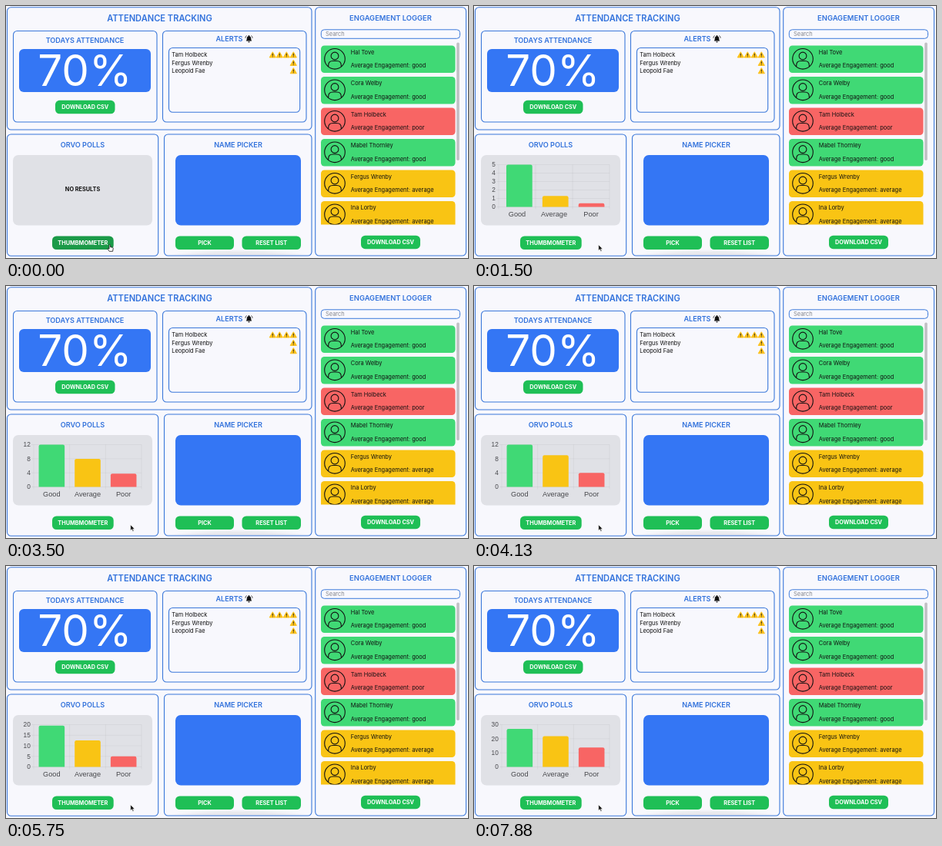
Recreate the animation shown at these times as an HTML page. Size 600 px wide and 328 px high, loop 8 s.

```html
<!DOCTYPE html>
<html lang="en">
<head>
<meta charset="utf-8">
<title>Attendance tracking</title>
<style>
  html, body { margin: 0; width: 100%; height: 100%; overflow: hidden; background: #f8f8fd; }
  svg { display: block; width: 100vw; height: 100vh; }
  text { font-family: Inter, "Open Sans", sans-serif; font-size: 7.45px; fill: #111; }
  .mid { text-anchor: middle; }
  .head { font-size: 9.1px; font-weight: 600; fill: #3272dc; text-anchor: middle; }
  .panel { fill: none; stroke: #3b78da; stroke-width: 1.1; }
  .blue { fill: #3476f4; }
  .btn rect { fill: #1fbf56; }
  .btn text { fill: #fff; font-size: 7.3px; font-weight: 700; text-anchor: middle; }
  .axis, .cats text { font-family: "Liberation Sans", Arial, sans-serif; fill: #48494d; }
  .axis { font-size: 8.3px; text-anchor: end; }
  .cats text { font-size: 9.2px; text-anchor: middle; }
</style>
</head>
<body>
<svg viewBox="0 0 600 328" preserveAspectRatio="none">
  <defs>
    <g id="person" fill="none" stroke="#111" stroke-width="1.1">
      <circle r="13.3"/>
      <circle cy="-3.8" r="4.9"/>
      <path d="M-8.3 10.2V8.5C-8.3 4.5-5.5 2.7-2.5 2.7H2.5C5.5 2.7 8.3 4.5 8.3 8.5V10.2"/>
    </g>
    <g id="warn">
      <path d="M0-3.7L4.1 3.5H-4.1Z" fill="#fcc21b" stroke="#fcc21b" stroke-linejoin="round"/>
      <path d="M0-1.7V1.2M0 2V2.9" stroke="#222"/>
    </g>
    <clipPath id="list"><rect x="405" y="48" width="182" height="236.5"/></clipPath>
    <radialGradient id="shade">
      <stop offset="0" stop-color="#000" stop-opacity=".08"/>
      <stop offset=".6" stop-color="#000" stop-opacity=".06"/>
      <stop offset="1" stop-color="#000" stop-opacity="0"/>
    </radialGradient>
    <clipPath id="picker"><rect x="206" y="317" width="190.5" height="8"/></clipPath>
  </defs>
  <rect width="600" height="328" fill="#f8f8fd"/>
  <ellipse cx="303" cy="326" rx="96" ry="9" fill="url(#shade)" clip-path="url(#picker)"/>
  <g id="panels"></g>

  <text class="head" x="199.5" y="20" style="font-size:11.1px">ATTENDANCE TRACKING</text>
  <text class="head" x="102.5" y="47.5">TODAYS ATTENDANCE</text>
  <text class="head" x="290" y="46">ALERTS</text>
  <text class="head" x="499.5" y="18.7" style="font-size:9.4px">ENGAGEMENT LOGGER</text>
  <text class="head" x="99.5" y="184">ORVO POLLS</text>
  <text class="head" x="301.5" y="184">NAME PICKER</text>

  <g transform="translate(315.5 42.7) scale(.9)">
    <path d="M-4.2 3.2C-2.9 1.9-3.2 .4-3-1C-2.7-3-1.5-3.9 0-4.1C1.5-3.9 2.7-3 3-1C3.2 .4 2.9 1.9 4.2 3.2ZM-1.3 3.9H1.3A1.3 1.3 0 0 1-1.3 3.9ZM-.6-5.2H.6V-3.5H-.6Z" fill="#111"/>
    <path d="M-3.3-4.8Q-5-3.3-5.2-1M3.3-4.8Q5-3.3 5.2-1" fill="none" stroke="#111" stroke-width=".8"/>
  </g>

  <rect class="blue" x="17" y="56" width="171" height="56" rx="6"/>
  <text class="mid" x="102.3" y="104" style="font-size:56.5px;font-weight:400;fill:#fff">70%</text>
  <rect class="blue" x="220" y="194" width="163" height="91.5" rx="7"/>
  <rect x="9" y="194" width="181" height="91.5" rx="7" fill="#e0e1e6"/>
  <text id="empty" class="mid" x="99.5" y="240.5" style="font-size:7.3px;font-weight:700">NO RESULTS</text>

  <g id="chart">
    <path id="grid" fill="none" stroke="#000" stroke-opacity=".09" stroke-width=".5"/>
    <g id="ticks"></g>
    <g id="cats" class="cats"><text y="274.2">Good</text><text y="274.2">Average</text><text y="274.2">Poor</text></g>
    <g id="bars"><path fill="#40d975"/><path fill="#f9c414"/><path fill="#f86564"/></g>
  </g>

  <g id="alerts"></g>
  <rect x="409.3" y="30.8" width="180.2" height="11.5" rx="4" fill="#f9f9fe" stroke="#3b78da"/>
  <text x="415" y="39.3" style="fill:#85868c">Search</text>
  <g id="rows" clip-path="url(#list)"></g>
  <rect x="585.2" y="47.5" width="3.6" height="153.5" rx="1.8" fill="#c0c0c4"/>
  <g id="buttons"></g>

  <g id="cursor" stroke-linejoin="round">
    <path id="arrow" d="M0 0V7.6L1.8 6L3 8.7L4.3 8.1L3.1 5.5H5.4Z" fill="#111" stroke="#fff" stroke-width=".6"/>
    <path id="hand" d="M-.8 .6Q0-.6 .8 .6V3L3.7 3.6Q4.6 4 4.4 5L3.8 8.6H-.6L-2.8 5.6Q-2.6 4.5-1.6 5L-.8 5.6Z" fill="#fff" stroke="#111" stroke-width=".8"/>
  </g>
</svg>
<script>
const $ = id => document.getElementById(id);
const fill = (id, items, draw) => { $(id).innerHTML = items.map(draw).join(''); };

fill('panels', [
  [1.5, 1.7, 397, 161], [9.5, 32.5, 196, 151], [203.5, 32.5, 390, 151], [211.5, 54.5, 381.7, 138.3],
  [1.5, 167, 197.7, 325.3], [205.5, 167, 397, 325], [401.7, 1.7, 597.5, 325]
], ([x, y, r, b]) => `<rect class="panel" x="${x}" y="${y}" width="${r - x}" height="${b - y}" rx="5"/>`);

fill('buttons', [
  ['DOWNLOAD CSV', 64, 122.8, 77.5], ['THUMBMOMETER', 60, 299.5, 79.7], ['PICK', 220, 299.5, 76],
  ['RESET LIST', 306.5, 299.5, 76.5], ['DOWNLOAD CSV', 461, 298.7, 77]
], ([label, x, y, w]) => `<g class="btn"><rect x="${x}" y="${y}" width="${w}" height="17.5" rx="5.5"/>
  <text x="${x + w / 2}" y="${y + 11.4}">${label}</text></g>`);

fill('alerts', [['Tam Holbeck', 4], ['Fergus Wrenby', 1], ['Leopold Fae', 1]], ([name, count], i) => {
  const y = 66.3 + i * 10.4;
  let out = `<text x="215.3" y="${y}">${name}</text>`;
  for (let k = 0; k < count; k++) out += `<use href="#warn" x="${373.3 - k * 9}" y="${y - 2.8}"/>`;
  return out;
});

const levels = { good: '#40d975', average: '#f9c414', poor: '#f86564' };
fill('rows', [
  ['Hal Tove', 'good'], ['Cora Welby', 'good'], ['Tam Holbeck', 'poor'],
  ['Mabel Thornley', 'good'], ['Fergus Wrenby', 'average'], ['Ina Lorby', 'average']
], ([name, level], i) => {
  const y = 51.5 + i * 40.5;
  return `<rect x="409" y="${y}" width="174.5" height="35.5" rx="4.5" fill="${levels[level]}"/>
    <use href="#person" x="427" y="${y + 17.3}"/>
    <text x="447.8" y="${y + 11}">${name}</text>
    <text x="447.8" y="${y + 28.5}">Average Engagement: ${level}</text>`;
});

// Poll results arrive once a second; bars ease to the new layout.
const LOOP = 8000, FIRST = 370, EVERY = 1000;
const BASE = 261.5, HEIGHT = 55, RIGHT = 176;
const polls = [
  { max: 2, step: .5, votes: [2, 0, 0] },
  { max: 5, step: 1, votes: [5, 3, 1] },
  { max: 10, step: 2, votes: [10, 6, 3] },
  { max: 12, step: 4, votes: [12, 9, 4] },
  { max: 20, step: 5, votes: [17, 10, 5] },
  { max: 20, step: 5, votes: [20, 13, 5] },
  { max: 25, step: 5, votes: [23, 16, 9] },
  { max: 30, step: 10, votes: [27, 22, 14] }
];
const left = p => p.step < 1 ? 38 : p.max < 10 ? 32 : 36;
const slot = p => (RIGHT - left(p)) / 3;
const center = (p, i) => left(p) + slot(p) * (i + .5);
const mix = (a, b, k) => a + (b - a) * k;
const easeOut = x => 1 - (1 - x) ** 4;
const clamp = x => Math.min(1, Math.max(0, x));
let shown = -1;

function drawAxes(p) {
  const x0 = left(p);
  let lines = '', labels = '';
  for (let v = 0; v <= p.max; v += p.step) {
    const y = BASE - HEIGHT * v / p.max;
    lines += `M${x0 - 3} ${y}H${RIGHT}`;
    labels += `<text class="axis" x="${x0 - 4.2}" y="${y + 2.8}">${p.step < 1 && v ? v.toFixed(1) : v}</text>`;
  }
  for (let i = 0; i < 4; i++) lines += `M${x0 + slot(p) * i} ${BASE - HEIGHT}V${BASE + 3}`;
  $('grid').setAttribute('d', lines);
  $('ticks').innerHTML = labels;
  [...$('cats').children].forEach((t, i) => t.setAttribute('x', center(p, i)));
}

function drawChart(t) {
  const n = Math.floor((t - FIRST) / EVERY);
  $('empty').style.display = n < 0 ? '' : 'none';
  $('chart').style.display = n < 0 ? 'none' : '';
  if (n < 0) return;
  const now = polls[n], old = polls[n - 1] || { ...now, votes: [0, 0, 0] };
  if (n !== shown) drawAxes(now);
  shown = n;
  const k = easeOut((t - FIRST - n * EVERY) / EVERY);
  [...$('bars').children].forEach((bar, i) => {
    const x = mix(center(old, i), center(now, i), k);
    const w = mix(slot(old), slot(now), k) * .72;
    const h = HEIGHT * mix(old.votes[i] / old.max, now.votes[i] / now.max, k);
    const r = Math.min(2.2, h);
    bar.setAttribute('d', `M${x - w / 2} ${BASE}v${r - h}q0 ${-r} ${r} ${-r}h${w - 2 * r}q${r} 0 ${r} ${r}v${h - r}Z`);
  });
}

const thumb = $('buttons').children[1].firstElementChild;
function drawCursor(t) {
  const k = clamp((t - 500) / 500);
  const x = mix(134.8, 161.7, k * k * (3 - 2 * k));
  const over = x < 139.7;
  $('cursor').setAttribute('transform', `translate(${x} 310.7)`);
  $('hand').style.display = over ? '' : 'none';
  $('arrow').style.display = over ? 'none' : '';
  thumb.style.fill = over ? '#1b9a48' : '';
}

const start = performance.now();
function frame(now) {
  const t = Math.max(0, now - start) % LOOP;
  drawChart(t);
  drawCursor(t);
  requestAnimationFrame(frame);
}
frame(start);
</script>
</body>
</html>
```
